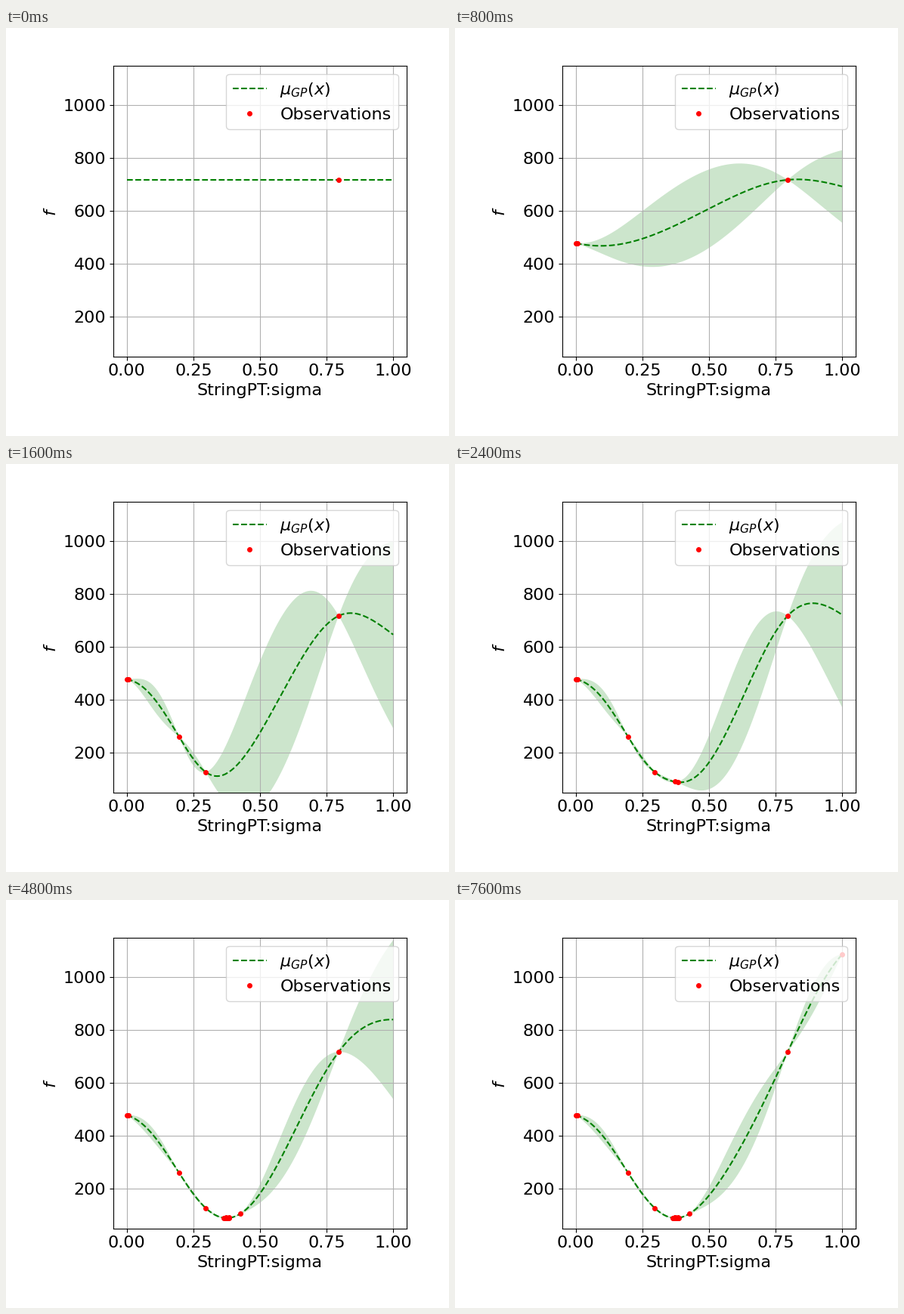
A matplotlib script that plays this animation: 586 px wide and 540 px high, repeating every 8000 ms.

```python
import numpy as np
import matplotlib.pyplot as plt
from matplotlib.animation import FuncAnimation

W, H, DPI = 586, 540, 100
STEPS, STEP_MS = 20, 400
NOISE = 2e-5
GOLDEN = (np.sqrt(5) - 1) / 2
GRID = np.linspace(0, 1, 201)

# Exploring samples by step; every other step samples close to the minimum.
EXPLORE = {0: (0.7955, 718), 1: (0, 478), 2: (0.0075, 476.5),
           3: (0.1965, 260), 4: (0.2965, 127), 9: (0.427, 106),
           13: (1, 1086)}
END_STEP = 13      # the right end is sampled here
LATE_LEVEL = 500   # prior mean from then on

# Hyperparameters at a few key steps, linear in between.
KEY_STEPS = (0, 1, 2, 4, 8, 12)
LENGTHS = (0.40, 0.40, 0.40, 0.27, 0.40, 0.44)
SCALES = (0, 298, 243, 480, 650, 650)
END_MEANS = (718, 690, 693, 647, 797, 840)


def take_samples():
    samples, k = [], 0
    for step in range(STEPS):
        if step in EXPLORE:
            samples.append(EXPLORE[step])
        else:
            x = 0.364 + 0.023 * ((0.8 + GOLDEN * k) % 1)
            y = 88.5 + 3 * ((0.755 * k) % 1)
            samples.append((x, y))
            k += 1
    return np.array(samples)


SAMPLES = take_samples()


def matern(a, b, length):
    r = np.sqrt(5) * np.abs(a[:, None] - b[None, :]) / length
    return (1 + r + r * r / 3) * np.exp(-r)


def posterior(step):
    """Mean and band half-width on GRID after the given step."""
    length, scale, end = (np.interp(step, KEY_STEPS, values)
                          for values in (LENGTHS, SCALES, END_MEANS))
    x, y = SAMPLES[:step + 1].T
    gram = matern(x, x, length) + NOISE * np.eye(len(x))
    k = matern(GRID, x, length)
    w = np.linalg.solve(gram, k.T).T

    # Pick the prior mean so that the curve meets its value at x = 1.
    if step < END_STEP:
        level = (end - w[-1] @ y) / (1 - w[-1].sum())
    else:
        level = LATE_LEVEL

    spread = np.sqrt(np.clip(1 - np.sum(w * k, axis=1), 0, None))
    return level + w @ (y - level), scale * spread


plt.rcParams["font.family"] = "DejaVu Sans"
plt.rcParams["font.size"] = 16

fig = plt.figure(figsize=(W / DPI, H / DPI), dpi=DPI, facecolor="white")
ax = fig.add_axes([142.2 / W, 105.25 / H, 387.5 / W, 385 / H])
ax.set_xlim(-0.05, 1.05)
ax.set_ylim(50, 1150)
ax.set_xticks(np.arange(0, 1.01, 0.25))
ax.set_yticks(range(200, 1001, 200))
ax.grid(True)
ax.set_xlabel("StringPT:sigma")
ax.set_ylabel("$f$")

band = plt.Polygon([(0, 0), (1, 0), (1, 1)], facecolor="g", alpha=0.2,
                   linewidth=0, zorder=1)
ax.add_patch(band)
mean_line, = ax.plot([], [], "g--", label=r"$\mu_{GP}(x)$")
dots, = ax.plot([], [], "ro", markersize=4, label="Observations")
ax.legend(loc="upper right")


def draw(step):
    mean, half = posterior(step)
    upper = np.column_stack([GRID, mean + half])
    lower = np.column_stack([GRID, mean - half])
    band.set_xy(np.vstack([upper, lower[::-1]]))
    band.set_visible(half.max() > 0)
    mean_line.set_data(GRID, mean)
    dots.set_data(*SAMPLES[:step + 1].T)
    return band, mean_line, dots


anim = FuncAnimation(fig, draw, frames=STEPS, interval=STEP_MS,
                     repeat=True, repeat_delay=0)
plt.show()
```
